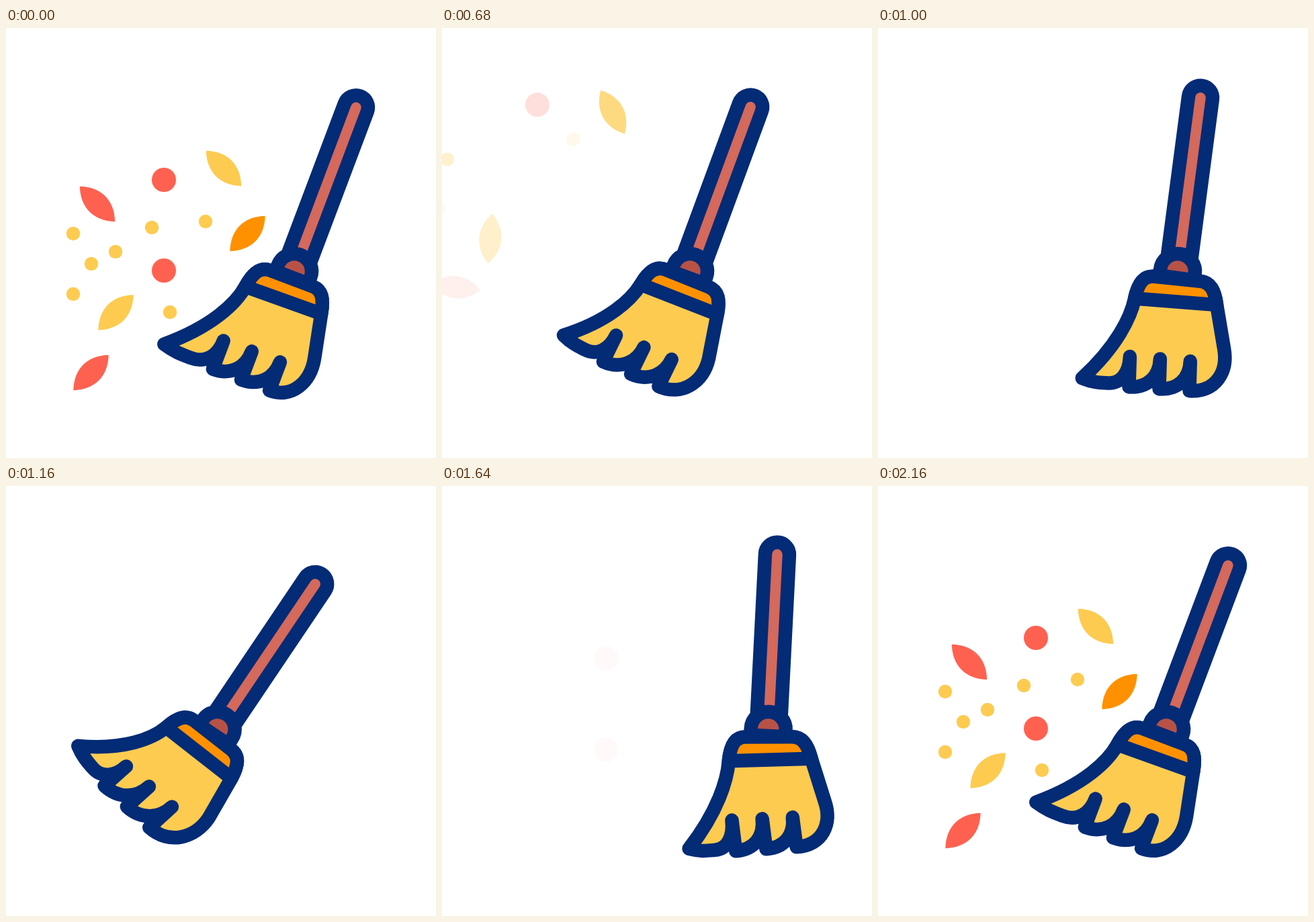
An HTML page with a canvas that plays this animation: 640x640 px, repeating every 2.2 s.

```html
<!DOCTYPE html>
<html lang="en">
<head>
<meta charset="utf-8">
<title>Sweeping broom</title>
<style>
  html, body { margin: 0; width: 100%; height: 100%; overflow: hidden; background: #fff; }
  canvas { display: block; width: 640px; height: 640px; }
</style>
</head>
<body>
<canvas id="stage" width="640" height="640"></canvas>
<script>
const ctx = document.getElementById('stage').getContext('2d');
const LOOP = 2200, STEP = 40;
const NAVY = '#032b76', YELLOW = '#fdcb50', ORANGE = '#ff9100', RED = '#ff6150';
const WOOD = '#d4695c', KNOB = '#b85247';
const PIVOT_Y = 362;

// Broom at the end of each stroke: pivot x, tilt in degrees, bristle bend
const REST = [429, 20.66, 0];
const STROKES = [REST, [307, 31.5, -1.4], [508, -5, 1.4], [307, 35.5, -1.4], [511, -5, 1.4], REST];
const FIRST_TURN = 560, STROKE_MS = 320;

// Loose pieces: x, y and the time they have faded out
const DOTS = [
  [100, 306, 750], [127, 351, 562], [163, 333, 625], [217, 297, 600],
  [297, 288, 710], [100, 396, 705], [244, 423, 562]
];
const BALLS = [[235, 226, 730], [235, 361, 625]];
// Leaves add colour, resting angle and turning direction
const LEAVES = [
  [136, 262, 625, RED, -45, 1], [324, 209, 860, YELLOW, -45, 1],
  [359.5, 306, 580, ORANGE, 45, -1], [163.5, 423.5, 755, YELLOW, 45, -1],
  [126.5, 513, 705, RED, 45, 1]
];

const clamp = v => Math.min(1, Math.max(0, v));
const rad = deg => deg * Math.PI / 180;
const easeInOut = p => (1 - Math.cos(Math.PI * clamp(p))) / 2;

function broomPose(t) {
  // The first stroke starts from rest and takes a little longer
  const phase = t < FIRST_TURN ? clamp((t - 200) / (FIRST_TURN - 200)) : 1 + (t - FIRST_TURN) / STROKE_MS;
  const i = Math.min(Math.floor(phase), STROKES.length - 2);
  const p = easeInOut(phase - i);
  return STROKES[i].map((from, k) => from + (STROKES[i + 1][k] - from) * p);
}

// Bends a point of the head: shear grows with v, the ends curl and lift
function warp(u, v, bend) {
  const curl = Math.min(1, 1.6 * Math.abs(bend));
  const tip = Math.max(0, (-u - 62) / 81), side = Math.max(0, (u - 30) / 44);
  return [
    u + bend * (.06 * v + .0004 * v * v) + curl * (13 * tip + 4 * side),
    v - bend * u * (.05 + .0004 * v) - curl * (4 - 1.2 * bend) * v / 180 - Math.max(0, -bend) * 5 * tip
  ];
}

// Each segment holds one point (line) or three points (curve)
function bentPath(bend, segments) {
  const path = new Path2D();
  segments.forEach((seg, i) => {
    const pts = [];
    for (let k = 0; k < seg.length; k += 2) pts.push(...warp(seg[k], seg[k + 1], bend));
    if (!i) path.moveTo(...pts);
    else if (pts.length === 2) path.lineTo(...pts);
    else path.bezierCurveTo(...pts);
  });
  path.closePath();
  return path;
}

const CROWN = [
  [-60, 47], [-57, 24, -50, 11.5, -34, 11.5], [34, 11.5], [49, 11.5, 55.5, 23, 60, 45]
];
const tuft = u => [[u, 179], [u, 134], [u, 160, u - 17, 179, u - 45, 179]];
const BRUSH = [
  ...CROWN, [74, 111], [81, 146, 64, 179, 28, 179],
  ...tuft(28), ...tuft(-17),
  [-62, 134], [-62, 158, -76, 175, -98, 175],
  [-110, 175, -122, 176, -143, 170], [-85, 120, -64, 75, -60, 47]
];

function paint(path, fill) {
  ctx.fillStyle = fill;
  ctx.fill(path);
  ctx.stroke(path);
}

function drawBroom(t) {
  const [x, tilt, bend] = broomPose(t);
  ctx.save();
  ctx.translate(x, PIVOT_Y);
  ctx.rotate(rad(tilt));
  ctx.strokeStyle = NAVY;
  ctx.lineWidth = 20.5;
  ctx.lineJoin = ctx.lineCap = 'round';

  const handle = new Path2D();
  handle.moveTo(-18, -22);
  handle.arc(0, -260.5, 18, Math.PI, 0);
  handle.lineTo(18, -22);
  paint(handle, WOOD);

  const knob = new Path2D();
  knob.arc(0, 0, 26, Math.PI, 0);
  knob.lineTo(26, 10);
  knob.lineTo(-26, 10);
  knob.closePath();
  paint(knob, KNOB);

  paint(bentPath(bend, BRUSH), YELLOW);
  paint(bentPath(bend, CROWN), ORANGE);
  ctx.restore();
}

// Pieces that vanish sooner are blown away faster
function blowAway(t, gone) {
  const speed = 1 + Math.max(0, 720 - gone) / 110 - (Math.max(0, gone - 720) / 280) ** 2;
  const dist = speed * (Math.max(0, t - 200) / 200) ** 2.55;
  const fading = Math.max(0, t - gone + 250);
  return { x: -10 * dist, y: -12 * dist, alpha: 1 - clamp(fading / 250), spin: .23 * fading };
}

function settle(t, start) {
  const left = (1 - clamp((t - start) / 340)) ** 2;
  return { x: 10 * left, y: 35 * left, alpha: clamp((t - start) / 260) ** 1.3, spin: -35 * left };
}

// Places one piece and lets shape() trace it around the origin
function drawPiece(t, [x, y, gone, color, angle = 0, turn = 0], shape, start = 1834 - x * .45) {
  const d = t < 1600 ? blowAway(t, gone) : settle(t, start);
  ctx.save();
  ctx.globalAlpha = d.alpha;
  ctx.translate(x + d.x, y + d.y);
  ctx.rotate(rad(angle + turn * d.spin));
  ctx.fillStyle = color;
  ctx.beginPath();
  shape();
  ctx.fill();
  ctx.restore();
}

const disc = radius => () => ctx.arc(0, 0, radius, 0, 2 * Math.PI);

function leaf() {
  ctx.moveTo(0, -37);
  ctx.bezierCurveTo(22, -14, 22, 14, 0, 37);
  ctx.bezierCurveTo(-22, 14, -22, -14, 0, -37);
}

function draw(now) {
  const t = Math.floor((now % LOOP) / STEP) * STEP;
  ctx.fillStyle = '#fff';
  ctx.fillRect(0, 0, 640, 640);
  drawBroom(t);
  DOTS.forEach(dot => drawPiece(t, [...dot, YELLOW], disc(10.2)));
  BALLS.forEach(ball => drawPiece(t, [...ball, RED], disc(18), 1620));
  LEAVES.forEach(item => drawPiece(t, item, leaf));
}

function tick() {
  draw(performance.now());
  requestAnimationFrame(tick);
}
tick();
</script>
</body>
</html>
```
